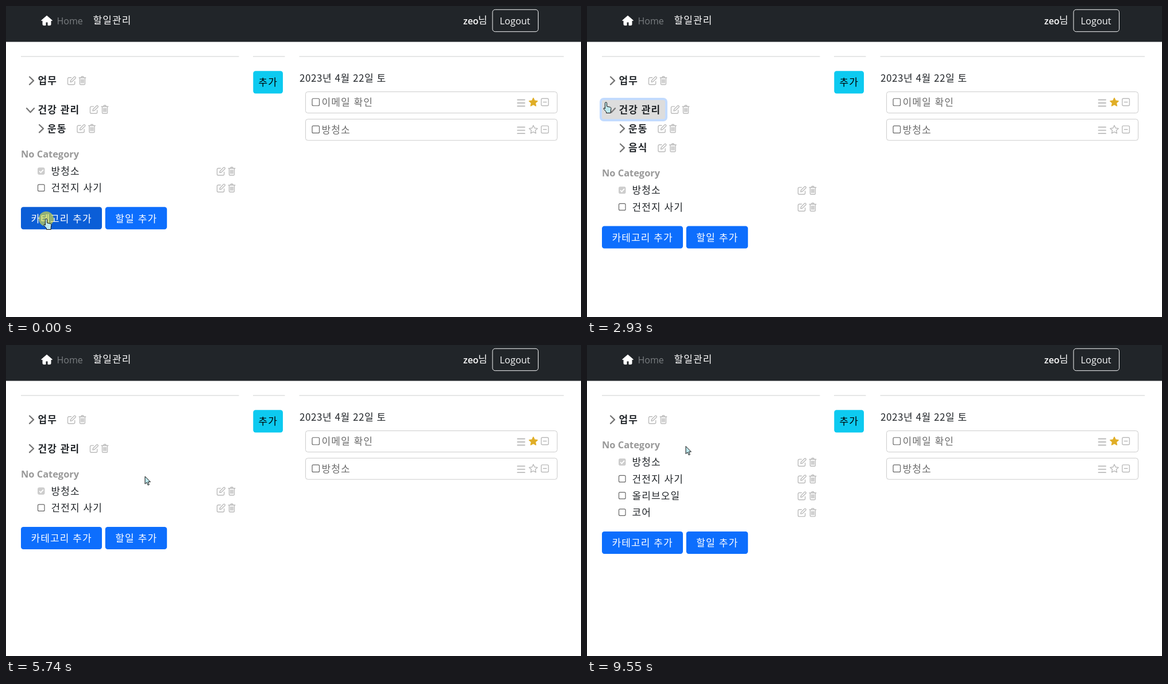
An HTML page that plays this animation: 1001x542 px, repeating every 9780 ms.

```html
<!DOCTYPE html>
<html lang="ko">
<head>
<meta charset="utf-8">
<title>할일관리</title>
<style>
  html, body { margin: 0; width: 100%; height: 100%; overflow: hidden; background: #fff; }
  svg { display: block; width: 100%; height: 100%; }
  text { font: 17px "Noto Sans CJK KR", "Noto Sans CJK JP", "Noto Sans CJK", sans-serif; letter-spacing: 1.1px; fill: #212529; }
  .latin { font: 16.4px "Open Sans", "Noto Sans", sans-serif; letter-spacing: 0; }
  .bold { font-weight: 700; }
  .icon { fill: none; stroke: #bbb; stroke-width: 1.4; stroke-linejoin: round; stroke-linecap: round; }
  .chevron { fill: none; stroke: #777; stroke-width: 2.3; stroke-linecap: round; stroke-linejoin: round; }
</style>
</head>
<body>
<svg id="stage" viewBox="0 0 1001 542" preserveAspectRatio="none">
  <rect width="1001" height="62.5" fill="#212529"/>
  <path d="M71 17L61.5 25.3H64V32a1.6 1.6 0 0 0 1.6 1.6H69V28h4v5.6h3.4A1.6 1.6 0 0 0 78 32V25.3H80.5Z" fill="#fff" stroke="#fff" stroke-linejoin="round"/>
  <text class="latin" x="88.5" y="32" style="font-size:16px;fill:#7a7e81">Home</text>
  <text x="151.5" y="31.3" style="fill:#fff">할일관리</text>
  <text class="latin" x="796" y="31.5" style="font-size:16px;font-weight:600;fill:#fff">zeo</text>
  <text x="822" y="31.3" style="fill:#fff">님</text>
  <rect x="847" y="6.3" width="79.5" height="38.4" rx="4.5" fill="none" stroke="#f8f9fa"/>
  <text class="latin" x="859.5" y="32" style="fill:#f8f9fa">Logout</text>
  <g id="page"></g>
  <g id="pointer"></g>
</svg>
<script>
const LOOP = 9780;
const BLUE = '#0d6efd', BLUE_HOVER = '#0b5ed7';
const page = document.getElementById('page');
const pointer = document.getElementById('pointer');

// --- drawing helpers ---
const text = (x, mid, str, style = '', cls = '') =>
  `<text class="${cls}" x="${x}" y="${mid + 6.3}" style="${style}">${str}</text>`;
const rect = (x, y, w, h, r, attrs) =>
  `<rect x="${x}" y="${y}" width="${w}" height="${h}" rx="${r}" ${attrs}/>`;
const rule = (x1, x2) => rect(x1, 87.3, x2 - x1, 1.4, 0, 'fill="#dcdddd"');
const icon = (x, y, d) => `<path class="icon" transform="translate(${x} ${y})" d="${d}"/>`;

const PEN = 'M7 2.8H3A2 2 0 0 0 1 4.8V13A2 2 0 0 0 3 15H11.2A2 2 0 0 0 13.2 13V9.5' +
  'M5.5 10.5L6.1 7.7L12.2 1.6A1.3 1.3 0 0 1 14.1 1.6L14.5 2A1.3 1.3 0 0 1 14.5 3.9L8.3 10Z';
const TRASH = 'M.7 3H12.3M4 3L5 1H8L9 3M2 3V13.4A1.6 1.6 0 0 0 3.6 15H9.4A1.6 1.6 0 0 0 11 13.4V3' +
  'M4.4 6V12M6.5 6V12M8.6 6V12';
const tools = (x, mid) => icon(x, mid - 8, PEN) + icon(x + 20, mid - 8, TRASH);

const chevron = (x, mid, open) => `<path class="chevron" d="${open
  ? `M${x - 5} ${mid - 2}l6.5 7 6.5-7` : `M${x} ${mid - 6.5}l7 6.7-7 6.7`}"/>`;

function star(cx, cy, on) {
  const pts = Array.from({ length: 10 }, (_, i) => {
    const r = i % 2 ? 3.7 : 7.6, a = Math.PI * (i / 5 - .5);
    return `${(cx + r * Math.cos(a)).toFixed(1)},${(cy + r * Math.sin(a)).toFixed(1)}`;
  });
  return `<polygon class="icon" points="${pts.join(' ')}"${on ? ' style="fill:#e0ae27;stroke:#e0ae27"' : ''}/>`;
}

function checkbox(x, mid, off, size = 11.5) {
  const y = mid - size / 2;
  return off
    ? rect(x, y, size, size, 2, 'fill="#cdcdcd" stroke="#cdcdcd"') +
      `<path d="M${x + 2.5} ${mid}l2.5 2.6 4.5-5" fill="none" stroke="#fff" stroke-width="1.8"/>`
    : rect(x, y, size, size, 2, 'fill="#fff" stroke="#666" stroke-width="1.2"');
}

const button = (x, y, w, label, pad, fill) =>
  rect(x, y, w, 39, 4.2, `fill="${fill}"`) + text(x + pad, y + 20, label, 'fill:#fff');

const halo = (x, y, w, h) =>
  rect(x, y, w, h, 5, 'fill="#ddd" stroke="#c2dbfe" stroke-width="4"');

// --- list page ---
function card(y, label, starred) {
  const mid = y + 18.5;
  return rect(521.5, y, 438, 37, 4, 'fill="#fff" stroke="#ccc"') +
    checkbox(533, mid - .5, false, 12.5) + text(549.5, mid - .5, label, 'fill:#6b6b6b') +
    `<path class="icon" style="stroke-width:1.8" d="M890.5 ${mid - 4.5}h12.5m-12.5 5.5h12.5m-12.5 5.5h12.5"/>` +
    star(918, mid, starred) + rect(931.8, mid - 6.8, 12.6, 12.6, 2, 'class="icon"') +
    `<path class="icon" d="M935.3 ${mid - .5}h5.6"/>`;
}

const todo = (x, mid, label, off) =>
  checkbox(x, mid, off) + text(x + 23, mid, label) + tools(366.5, mid + .3);

function list({ open, foods, oil, removed, hover, focus }) {
  let out = rule(26, 405.5) + rule(430, 485.5) + rule(510.5, 971);
  out += chevron(41, 130, false) + text(55.5, 130, '업무', '', 'bold') + tools(106.5, 130);
  let y = 174;
  if (!removed) {
    if (focus === 'health') out += halo(24, 162, 114, 37);
    out += chevron(41, 180.3, open) + text(55.5, 180.3, '건강 관리', '', 'bold') + tools(145.5, 180.3);
    y = 224.5;
    if (open) {
      out += chevron(58, 213.5, false) + text(72, 213.5, '운동', '', 'bold') + tools(123, 213.5);
      y = 257.7;
      if (foods) {
        if (focus === 'food') out += halo(41, 229, 73, 37);
        out += chevron(58, 247, oil) + text(72, 247, '음식', '', 'bold') + tools(123, 247);
        y = 291;
        if (oil) {
          out += todo(76.5, 276, '올리브오일');
          y = 316.2;
        }
      }
    }
  }
  out += text(26, y - .3, 'No Category', 'font-size:16.4px;fill:#999', 'latin bold');
  const items = ['방청소', '건전지 사기'].concat(removed ? ['올리브오일', '코어'] : []);
  items.forEach((name, i) => out += todo(55.5, y + 30 + i * 29.2, name, i === 0));
  const by = y + 34.2 + items.length * 29.2;
  out += button(26, by, 141, '카테고리 추가', 17.5, hover === 'cat' ? BLUE_HOVER : BLUE);
  out += button(172.8, by, 107.4, '할일 추가', 17.5, hover === 'todo' ? BLUE_HOVER : BLUE);
  out += rect(430.3, 113.3, 51.7, 39.2, 4.2, 'fill="#0dcaf0"') + text(439.5, 133, '추가', 'fill:#000');
  out += text(511, 126, '2023년 4월 22일 토', 'letter-spacing:.55px');
  return out + card(149.5, '이메일 확인', true) + card(197.2, '방청소', false);
}

// --- form pages ---
const field = (y, value, focused) =>
  (focused ? rect(134.5, y - 2, 729, 43, 6, 'fill="none" stroke="#c2dbfe" stroke-width="4"') : '') +
  rect(136.5, y, 725, 39, 4, `fill="#fff" stroke="${focused ? '#86b7fe' : '#ced4da'}"`) +
  text(149.5, y + 20, value);

function menu(rows, active, ink) {
  const h = rows.length * 23.4 + 1;
  let out = rect(136, 178, 724.5, h, 0,
    'fill="#fff" stroke="#555" style="filter:drop-shadow(0 2px 3px rgba(0,0,0,.3))"');
  rows.forEach((row, i) => {
    const y = 178.6 + i * 23.4;
    if (i === active) out += rect(136.8, y, 723, 23.4, 0, 'fill="#1e90ff"');
    out += text(149.5, y + 11.4, row, `letter-spacing:.9px;fill:${i === active ? '#fff' : ink}`);
  });
  return out;
}

const PARENTS = ['[상위카테고리 생성]', '업무', '건강 관리'];
const GROUPS = ['카테고리 선택', '업무', '프로젝트', '건강 관리', '운동', '음식'];

function form({ wide, labels, rows, pick = 0, active = -1, focus, value = '', ink = '#222' }) {
  return (wide ? rule(0, 1001) : rule(136, 862)) +
    text(139.5, 125.5, labels[0]) + text(139.5, 190, labels[1]) +
    field(203.5, value, focus === 'name') + field(138.5, rows[pick], focus === 'pick') +
    rect(136, 267, 79, 39, 4.2, `fill="${BLUE}"`) +
    text(149, 287.3, 'Submit', 'font-size:16.1px;fill:#fff', 'latin') +
    (active >= 0 ? menu(rows, active, ink) : '');
}

const category = s => form({ wide: true, labels: ['상위 카테고리', '카테고리'], rows: PARENTS, ...s });
const task = s => form({ labels: ['카테고리', '할일'], rows: GROUPS, ...s });

// --- pointer ---
const SHAPES = {
  arrow: 'M0 0V13.2L3 10.4L5.2 15.3L7.3 14.3L5.2 9.6H9.4Z',
  hand: 'M-1.6 1.4a1.6 1.6 0 0 1 3.2 0V7L7.6 8.4q1.5.5 1.4 2.2L8.2 15.5V18.5H.5V16.5L-4 11.5q-.6-1.6 1-1.8L-1.6 11Z',
  beam: 'M-3 -7H3M0 -7V7M-3 7H3'
};
function drawPointer(x, y, shape, click) {
  return (click ? `<circle cx="${x}" cy="${y}" r="13" fill="#f2ec32" fill-opacity="${click}"/>` : '') +
    `<path transform="translate(${x} ${y})" d="${SHAPES[shape]}" fill="#bfe9ee" stroke="#111" stroke-linejoin="round"/>`;
}

// --- story: start time, view, its state, pointer [x, y, shape, click strength] ---
const steps = [
  [0, list, { open: true, hover: 'cat' }, [70, 371, 'hand', .58]],
  [230, category, {}, [70, 371, 'arrow']],
  [445, category, {}, [112, 292, 'arrow']],
  [660, category, {}, [178, 190, 'arrow']],
  [875, category, { focus: 'pick' }, [196, 160, 'arrow', .65]],
  [1090, category, { focus: 'pick', active: 0 }, [196, 165, 'arrow']],
  [1280, category, { focus: 'pick', active: 2 }, [197, 230, 'arrow']],
  [1490, category, { focus: 'pick', pick: 2, active: 2, ink: '#555' }, [197, 233, 'arrow', .65]],
  [1700, category, { focus: 'name', pick: 2 }, [197, 230, 'beam', .65]],
  [1910, category, { focus: 'name', pick: 2, value: '음' }, [197, 230, 'beam']],
  [2120, category, { focus: 'name', pick: 2, value: '음식' }, [197, 230, 'beam']],
  [2330, list, { foods: true }, [197, 230, 'arrow']],
  [2530, list, { foods: true }, [110, 205, 'arrow']],
  [2730, list, { foods: true, focus: 'health' }, [36, 175, 'hand', .65]],
  [2930, list, { open: true, foods: true, focus: 'health' }, [33, 168, 'hand']],
  [3130, list, { open: true, foods: true }, [130, 300, 'arrow']],
  [3330, list, { open: true, foods: true, hover: 'todo' }, [222, 402, 'hand', .58]],
  [3540, task, {}, [220, 380, 'arrow']],
  [3740, task, {}, [210, 215, 'arrow']],
  [3940, task, { focus: 'pick', active: 0 }, [207, 160.5, 'arrow', .58]],
  [4140, task, { focus: 'pick', active: 2 }, [200, 236, 'arrow']],
  [4340, task, { focus: 'pick', active: 5 }, [190, 304, 'arrow']],
  [4550, task, { focus: 'pick', pick: 5 }, [190, 304, 'arrow', .65]],
  [4750, task, { focus: 'name', pick: 5 }, [242, 229, 'beam', .65]],
  [4950, task, { focus: 'name', pick: 5, value: '올' }, [242, 229, 'beam']],
  [5150, task, { focus: 'name', pick: 5, value: '올리브' }, [242, 229, 'beam']],
  [5350, task, { focus: 'name', pick: 5, value: '올리브오' }, [242, 229, 'beam']],
  [5540, task, { focus: 'name', pick: 5, value: '올리브오일' }, [242, 229, 'beam']],
  [5740, list, { foods: true }, [242, 229, 'arrow']],
  [5940, list, { foods: true }, [132, 204, 'arrow']],
  [6140, list, { foods: true, focus: 'health' }, [42, 178, 'hand', .65]],
  [6330, list, { open: true, foods: true, focus: 'health' }, [42, 178, 'hand']],
  [6530, list, { open: true, foods: true, focus: 'food' }, [59, 245, 'hand', .65]],
  [6730, list, { open: true, foods: true, oil: true, focus: 'food' }, [59, 245, 'hand']],
  [6930, list, { open: true, foods: true, oil: true }, [128, 204, 'arrow']],
  [7150, list, { open: true, foods: true, oil: true }, [173, 177, 'arrow']],
  [7350, list, { open: true, foods: true, oil: true }, [173, 177, 'arrow', .7]],
  [7550, list, { removed: true }, [172, 176.5, 'arrow']]
];

let shown = -1;
function tick(now) {
  const t = now % LOOP;
  let i = steps.length - 1;
  while (steps[i][0] > t) i--;
  if (i !== shown) {
    const [, view, state, mouse] = steps[i];
    page.innerHTML = view(state);
    pointer.innerHTML = drawPointer(...mouse);
    shown = i;
  }
  requestAnimationFrame(frame);
}
const start = performance.now();
const frame = now => tick(Math.max(0, now - start));
tick(0);
</script>
</body>
</html>
```
